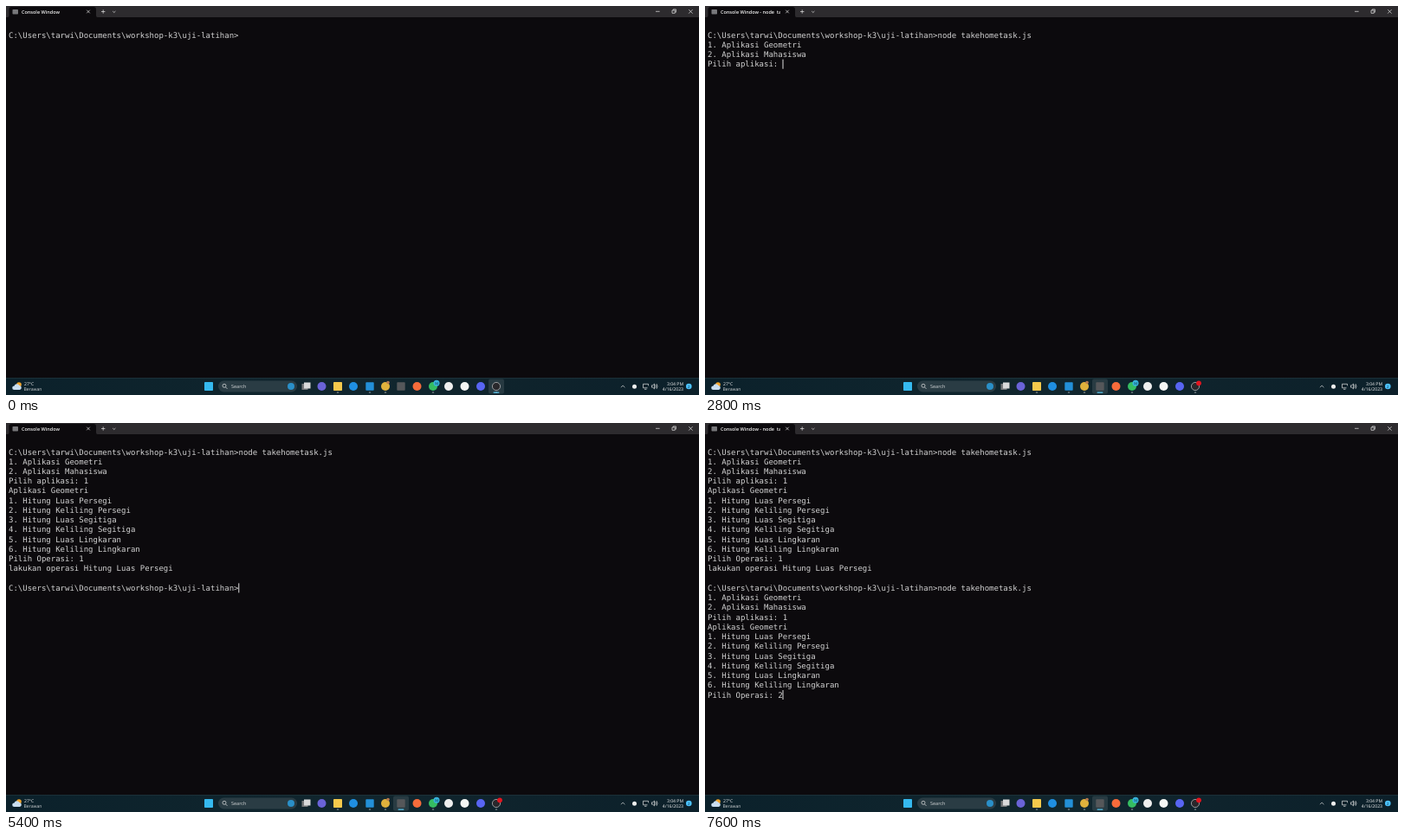
An HTML page that plays this animation: 800 px wide and 450 px high, repeating every 8 s.

```html
<!DOCTYPE html>
<html lang="id">
<head>
<meta charset="utf-8">
<title>Terminal session</title>
<style>
  html, body { margin: 0; width: 100%; height: 100%; overflow: hidden; background: #0c0a0d; }
  svg { display: block; }
  text { white-space: pre; text-rendering: geometricPrecision; font-family: "Open Sans", sans-serif; fill: #f2f2f2; }
  #rows text { font: 9px "DejaVu Sans Mono", monospace; fill: #d2d2d2; }
  .line { fill: none; stroke: #e6e6e6; stroke-width: .7; }
</style>
</head>
<body>
<svg width="800" height="450" viewBox="0 0 800 450">
  <defs>
    <linearGradient id="bar">
      <stop offset="0" stop-color="#0b212b"/>
      <stop offset=".5" stop-color="#11262e"/>
      <stop offset="1" stop-color="#0c202a"/>
    </linearGradient>
  </defs>
  <rect width="800" height="450" fill="#0c0a0d"/>

  <!-- window header -->
  <rect width="800" height="13" fill="#2d2b2e"/>
  <path d="M2 13Q3.500 13 3.500 11V4Q3.500 1 6.500 1H101Q104 1 104 4V11Q104 13 105.500 13Z" fill="#0c0a0d"/>
  <rect x="7.500" y="4" width="6.500" height="5.500" rx=".8" fill="#77777a"/>
  <svg x="18" width="69" height="13"><text id="title" y="8.800" font-size="5.500" font-weight="600"></text></svg>
  <path class="line" d="M93.200 4.700l3.600 3.600m0-3.600l-3.600 3.600M110 6.500h4.400m-2.200-2.200v4.400M123.200 6l1.600 1.500 1.600-1.500M750 6.300h4.600M769 5h3.200v3.300H769zM770.200 4.900v-1h3.200v3.300h-1M788.200 4.200l4.400 4.400m0-4.400l-4.400 4.400"/>

  <g id="rows"></g>
  <rect id="caret" width="1" height="11" fill="#dedede"/>

  <!-- taskbar -->
  <rect y="430" width="800" height="20" fill="url(#bar)"/>
  <rect y="430" width="800" height=".6" fill="#263940"/>
  <circle cx="15" cy="438" r="2.800" fill="#f3a52b"/>
  <path d="M9.500 444a2.300 2.300 0 0 1 0-4.600a3.300 3.300 0 0 1 6-.3a2.500 2.500 0 0 1 .5 4.900z" fill="#c9def0"/>
  <text x="21" y="438.700" font-size="5.100">27°C</text>
  <text x="20.500" y="445" font-size="5.100" fill-opacity=".85">Berawan</text>
  <rect x="245" y="433.500" width="91" height="13" rx="6.500" fill="#2a3c44"/>
  <circle class="line" cx="252" cy="439.300" r="2"/>
  <path class="line" d="M253.500 440.900l2 2"/>
  <text x="260" y="442" font-size="5.500" fill-opacity=".85">Search</text>
  <rect id="focus" y="431.500" width="18" height="17" rx="2" fill="#fff" fill-opacity=".1"/>
  <rect x="341.500" y="437" width="7" height="7" fill="#77797b"/>
  <rect x="344" y="435.500" width="7.500" height="7" fill="#d8d9da"/>
  <g id="icons"></g>
  <rect id="active" y="446.500" width="7" height="1.200" rx=".6" fill="#58c6ee"/>
  <circle cx="497" cy="436.300" r="3.500" fill="#37b4dc"/>
  <text x="497" y="437.900" font-size="4" text-anchor="middle" style="fill:#083040">34</text>
  <circle cx="441" cy="435.500" r="1.800" fill="#b77a50"/>
  <circle id="recording" cx="570" cy="436.300" r="2.900" fill="#e4151f"/>
  <path class="line" d="M710 441.200l2.200-2.200 2.200 2.200M740.500 441.800h-5v-4.500h6v2M737 443.300h2.500M745.500 438.800h1.200l1.800-1.700v5.800l-1.800-1.700h-1.200zM749.700 438.200q1.300 1.800 0 3.600M751 437.200q2 2.800 0 5.600"/>
  <circle cx="725.500" cy="440.200" r="2.500" fill="#eee"/>
  <g font-size="5.100" text-anchor="end">
    <text x="782" y="438.700">3:04 PM</text>
    <text x="782" y="445">4/16/2023</text>
  </g>
  <circle cx="788.300" cy="440" r="3.300" fill="#4cc2ff"/>
  <text x="788.300" y="441.600" font-size="4.300" text-anchor="middle" style="fill:#0a2430">2</text>

  <path id="mouse" d="M0 0V7.500L1.700 6 2.800 8.300 3.900 7.800 2.900 5.500H5.100Z" fill="#fff" stroke="#111" stroke-width=".4"/>
</svg>
<script>
const LOOP = 8000, LEFT = 3, CELL = 5.418, BASELINE = 36.5, LINE = 11.24;
const $ = id => document.getElementById(id);

function add(parent, tag, attributes) {
  const node = document.createElementNS('http://www.w3.org/2000/svg', tag);
  for (const key in attributes) node.setAttribute(key, attributes[key]);
  return parent.appendChild(node);
}

function place(node, attributes) {
  for (const key in attributes) node.setAttribute(key, attributes[key]);
}

// Taskbar icons: centre, half size, colour, round, running
[
  [234, 5, '#35b9ef', 0, 0], [329, 4, '#2a8fc8', 1, 0], [364.5, 5, '#6a63d8', 1, 0],
  [383, 5, '#f5c94c', 0, 1], [401, 5, '#1f8fe2', 1, 0], [420, 4.7, '#2390d8', 0, 1],
  [438, 5, '#dfb13c', 1, 1], [456, 4.7, '#55575a', 0, 0], [474.5, 5, '#f66b3b', 1, 0],
  [493, 5, '#35bd62', 1, 1], [511, 5, '#eeeeee', 1, 0], [529.5, 5, '#f4f6f4', 1, 0],
  [548, 5, '#5865f2', 1, 0], [566, 4.6, '#29282c', 1, 1]
].forEach(([x, r, fill, round, running]) => {
  add($('icons'), 'rect', { x: x - r, y: 440 - r, width: 2 * r, height: 2 * r, rx: round ? r : .8, fill });
  if (running) add($('icons'), 'rect', { x: x - 1.2, y: 446.6, width: 2.4, height: 1, rx: .5, fill: '#9aa4a8' });
});
place($('icons').lastChild.previousSibling, { stroke: '#c4c4c6', 'stroke-width': .7 });

const rows = Array.from({ length: 26 }, (_, i) =>
  add($('rows'), 'text', { x: LEFT, y: BASELINE + i * LINE }));

const prompt = 'C:\\Users\\tarwi\\Documents\\workshop-k3\\uji-latihan>';
const typed = prompt + 'node takehometask.js';
const menu = '\n1. Aplikasi Geometri\n2. Aplikasi Mahasiswa\nPilih aplikasi: ';
const operations = '1\nAplikasi Geometri\n' +
  ['Persegi', 'Segitiga', 'Lingkaran'].map((shape, i) =>
    `${2 * i + 1}. Hitung Luas ${shape}\n${2 * i + 2}. Hitung Keliling ${shape}\n`).join('') +
  'Pilih Operasi: ';
const first = typed + menu;
const result = first + operations + '1\nlakukan operasi Hitung Luas Persegi\n';
const again = result + '\n' + typed;
const second = again + menu;

// Start time, screen text, caret shown, program running
const steps = [
  [0, prompt, 0, 0],
  [100, prompt, 1, 0],
  [800, prompt + 'cls', 1, 0],
  [900, prompt, 0, 0],
  [1400, typed, 1, 0],
  [2100, typed, 0, 0],
  [2600, typed + '\n', 1, 1],
  [2700, first, 1, 1],
  [3400, first, 0, 1],
  [3900, first + '1', 1, 1],
  [4000, first + operations, 1, 1],
  [4700, first + operations, 0, 1],
  [5100, first + operations + '1', 1, 1],
  [5300, result, 1, 1],
  [5400, result + '\n' + prompt, 1, 0],
  [6000, again, 1, 0],
  [6200, again + '\n', 1, 1],
  [6300, second, 1, 1],
  [6900, second, 0, 1],
  [7100, second + '1', 1, 1],
  [7300, second + operations, 1, 1],
  [7600, second + operations + '2', 1, 1]
];

function show(node, visible) {
  node.style.visibility = visible ? 'visible' : 'hidden';
}

function render(time) {
  const [, text, caret, running] = steps.filter(step => step[0] <= time).pop();
  const lines = text.split('\n');
  rows.forEach((row, i) => row.textContent = lines[i] || '');
  $('title').textContent = 'Console Window' + (running ? ' - node  takehometask.js' : '');
  show($('caret'), caret);
  place($('caret'), {
    x: LEFT + lines.at(-1).length * CELL - .2,
    y: BASELINE - 8.5 + (lines.length - 1) * LINE
  });

  const focused = time >= 100;
  const app = focused ? 456 : 566;
  place($('focus'), { x: app - 9 });
  place($('active'), { x: app - 3.5 });
  show($('recording'), focused);

  // The pointer glides from the taskbar up to the middle, in 100 ms steps
  const glide = Math.min(1, Math.floor(time / 100) / 6);
  const rest = (1 - glide) ** 2;
  show($('mouse'), focused && time < 2600);
  place($('mouse'), { transform: `translate(${419.2 + 147 * rest} ${224.5 + 214 * rest})` });
}

function tick() {
  render(performance.now() % LOOP);
  requestAnimationFrame(tick);
}
tick();
</script>
</body>
</html>
```
